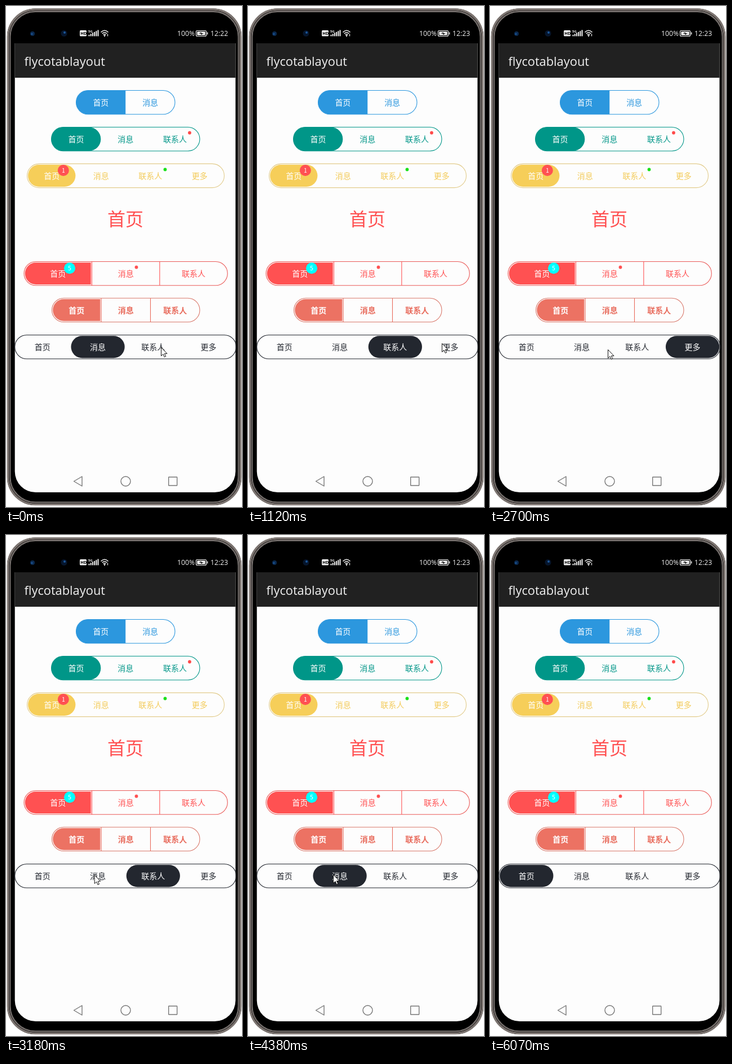
Write an HTML page that moves like this. It is 419 px wide and 887 px high and loops after 6170 ms.

```html
<!DOCTYPE html>
<html lang="zh-CN">
<head>
<meta charset="utf-8">
<title>flycotablayout</title>
<style>
html, body { margin: 0; width: 100%; height: 100%; overflow: hidden; background: #fff; }
svg { display: block; width: 419px; height: 887px; }
text { font-family: "Noto Sans CJK SC", "Noto Sans CJK", sans-serif; }
.latin { font-family: "Open Sans", "Noto Sans", sans-serif; fill: #f2f2f2; }
</style>
</head>
<body>
<svg id="stage" viewBox="0 0 419 887">
  <g id="body"></g>
  <!-- screen -->
  <path d="M15.7 66H407.5V824A37 37 0 0 1 370.5 861H52.7A37 37 0 0 1 15.7 824Z" fill="#fdfdfd"/>
  <rect x="15.7" y="66" width="391.8" height="61" fill="#212121"/>
  <text class="latin" x="32.5" y="106" font-size="21.8" font-weight="500">flycotablayout</text>
  <!-- status bar -->
  <circle cx="47" cy="49" r="4" fill="#0b2a50"/><circle cx="103" cy="48.5" r="5.5" fill="#06152c"/>
  <g fill="#1c5696"><circle cx="46" cy="49.5" r="1.6"/><circle cx="104" cy="47" r="2"/></g>
  <rect x="131" y="43" width="12" height="10.5" rx="1.5" fill="#f2f2f2"/>
  <text class="latin" x="132.3" y="51.3" font-size="7.5" font-weight="700" style="fill:#000">HD</text>
  <text class="latin" x="146" y="47" font-size="6" font-weight="700">5G</text>
  <g fill="none" stroke="#f2f2f2" stroke-width="1.6">
    <path id="signal" stroke-width="2"/>
    <path d="M168.5 46.5q6.5-6.5 13 0M170.7 49q4.3-4 8.6 0M172.8 51.3q2.2-1.8 4.4 0"/>
    <path d="M180.5 49.5v4" stroke-width="1.2"/>
    <rect x="337.5" y="43.5" width="18" height="10" rx="2" stroke-width="1.2"/>
    <path d="M357.6 46.5v4"/>
  </g>
  <circle cx="175" cy="53" r="1.2" fill="#f2f2f2"/>
  <rect x="339.3" y="45.3" width="14.4" height="6.4" rx="1" fill="#f2f2f2"/>
  <path d="M342 48.5l5-2v1.5l4 .5-5 2.5v-2z" fill="#222"/>
  <text class="latin" x="304" y="53" font-size="12.2">100%</text>
  <text class="latin" id="clock" x="363" y="53" font-size="12.2">12:22</text>
  <!-- navigation bar -->
  <g fill="none" stroke="#777" stroke-width="1.4" stroke-linejoin="round">
    <path d="M120.5 841.5L135 833V850Z"/><circle cx="212.5" cy="841.5" r="8.5"/>
    <rect x="288.7" y="834" width="15" height="15" rx=".5"/>
  </g>
  <g id="tabs"></g>
  <path id="cursor" d="M.5 .5V15.5L4 12.3L6.3 17.5L8.7 16.4L6.4 11.4H11Z" fill="#fff" stroke="#111"/>
</svg>
<script>
const $ = id => document.getElementById(id);
const LABELS = ['首页', '消息', '联系人', '更多'];
const LOOP = 6170, SLIDE = 250, HEIGHT = 42.2;
const DARK = '#23272f', RED = '#ff5152';

const box = (x, y, w, h, r, attrs) =>
  `<rect x="${x}" y="${y}" width="${w}" height="${h}" rx="${r}" ${attrs}/>`;
const dot = (x, y, fill, r = 2.9) => `<circle cx="${x}" cy="${y}" r="${r}" fill="${fill}"/>`;
const text = (s, x, y, fill, size = 14, attrs = '') =>
  `<text x="${x}" y="${y + size * 0.38}" font-size="${size}" fill="${fill}" text-anchor="middle" ${attrs}>${s}</text>`;
const badge = (x, y, fill, s) => dot(x, y, fill, 10) + text(s, x, y, '#fff', 10.5);

// metal rim: nested outlines around the black body
const rim = (inset, color, width) => box(2 + inset, 4.5 + inset, 416 - 2 * inset, 879.5 - 2 * inset,
  50 - inset, `fill="none" stroke="${color}" stroke-width="${width}"`);
$('body').innerHTML = box(2, 4.5, 416, 879.5, 50, 'fill="#000"') +
  rim(0.3, '#8d8581', 1.2) + rim(2, '#827a76', 2.4) + rim(3.9, '#4a4442', 1.4) + rim(5.5, '#7d7774', 1.8);
$('signal').setAttribute('d',
  Array.from({ length: 6 }, (_, i) => `M${147.5 + i * 3.2} 53.5v${-2.5 - i * 1.7}`).join(''));

// a row of n equal tabs; the first one is filled
function segment({ x, y, w, n, color, line = color, fill = color, inset = 0, round, cuts, attrs = '', pill = '' }) {
  const step = w / n, h = HEIGHT - 2 * inset, fw = step - 2 * inset, r = h / 2;
  const left = x + inset, top = y + inset;
  let out = round
    ? box(left, top, fw, h, r, `fill="${fill}" ${pill}`)
    : `<path d="M${left + fw} ${top}h${r - fw}a${r} ${r} 0 0 0 0 ${h}h${fw - r}z" fill="${fill}"/>`;
  out += box(x, y, w, HEIGHT, HEIGHT / 2, `fill="none" stroke="${line}" stroke-width="1.1"`);
  for (let i = 0; i < n; i++) {
    if (cuts && i) out += `<path d="M${x + step * i} ${y}v${HEIGHT}" stroke="${color}" stroke-width="1.1"/>`;
    out += text(LABELS[i], x + step * (i + 0.5), y + 21.5, i ? color : '#fff', 14, attrs);
  }
  return out;
}

const BAR = { x: 15.7, y: 582.5, w: 393, n: 4, color: DARK, inset: 1.5, round: true,
  attrs: 'class="choice"', pill: 'id="pill"' };

$('tabs').innerHTML =
  segment({ x: 124.5, y: 149.5, w: 175.5, n: 2, color: '#2c97de' }) +
  segment({ x: 80.5, y: 214.5, w: 263.5, n: 3, color: '#009688', round: true }) +
  dot(326, 224.5, '#ff4a4a') +
  segment({ x: 37.5, y: 279.4, w: 350, n: 4, color: '#f3cb5a', line: '#e2cc8c', fill: '#f6ce59', inset: 1.6, round: true }) +
  badge(101.8, 291, RED, 1) + dot(282.5, 289.5, '#1be01b') +
  text(LABELS[0], 212, 377, RED, 32) +
  segment({ x: 32, y: 452.5, w: 361.3, n: 3, color: RED, line: '#ea5a58', inset: 1.7, cuts: true }) +
  badge(113, 464.3, '#0ff', 5) + dot(231.5, 462.5, RED) +
  segment({ x: 81.5, y: 517.3, w: 262.5, n: 3, color: '#e86b5c', line: '#d9796c', fill: '#ec7263', inset: 1.7,
    cuts: true, attrs: 'font-weight="700"' }) +
  segment(BAR);

const pill = $('pill'), choices = document.querySelectorAll('.choice');

// start time and tab of each slide of the bottom bar
const SLIDES = [{ at: 15, tab: 2 }, { at: 1525, tab: 3 }, { at: 2790, tab: 2 }, { at: 4120, tab: 1 }, { at: 5600, tab: 0 }];
// pointer trips: each eases out to x, y
const TRIPS = [
  { at: 270, end: 850, x: 344, y: 597 },
  { at: 1710, end: 2250, x: 241, y: 600 },
  { at: 2560, end: 2700, x: 209, y: 608 },
  { at: 2700, end: 3400, x: 151, y: 601 },
  { at: 4560, end: 5200, x: 357, y: 849 },
  { at: 5200, end: 5400, x: 369, y: 865 }
];

const progress = (t, start, length) => Math.min(1, Math.max(0, (t - start) / length));
const easeOut = k => 1 - (1 - k) ** 2;
const easeInOut = k => 0.5 - 0.5 * Math.cos(Math.PI * k);

function draw(now) {
  const t = now % LOOP;
  let tab = 1, pos = 1;
  for (const s of SLIDES) {
    if (t < s.at) break;
    tab = s.tab;
    pos += (tab - pos) * easeInOut(progress(t, s.at, SLIDE));
  }
  pill.setAttribute('x', BAR.x + BAR.inset + BAR.w / BAR.n * pos);
  choices.forEach((c, i) => c.setAttribute('fill', i === tab ? '#fff' : DARK));

  let x = 275, y = 604;
  for (const p of TRIPS) {
    const k = easeOut(progress(t, p.at, p.end - p.at));
    x += (p.x - x) * k;
    y += (p.y - y) * k;
  }
  $('cursor').setAttribute('transform', `translate(${x} ${y})`);
  $('cursor').setAttribute('visibility', t < 5470 ? 'visible' : 'hidden');
  $('clock').textContent = t < 270 ? '12:22' : '12:23';
}

let origin;
function loop(now) {
  origin ??= now;
  draw(now - origin);
  requestAnimationFrame(loop);
}
draw(0);
requestAnimationFrame(loop);
</script>
</body>
</html>
```
